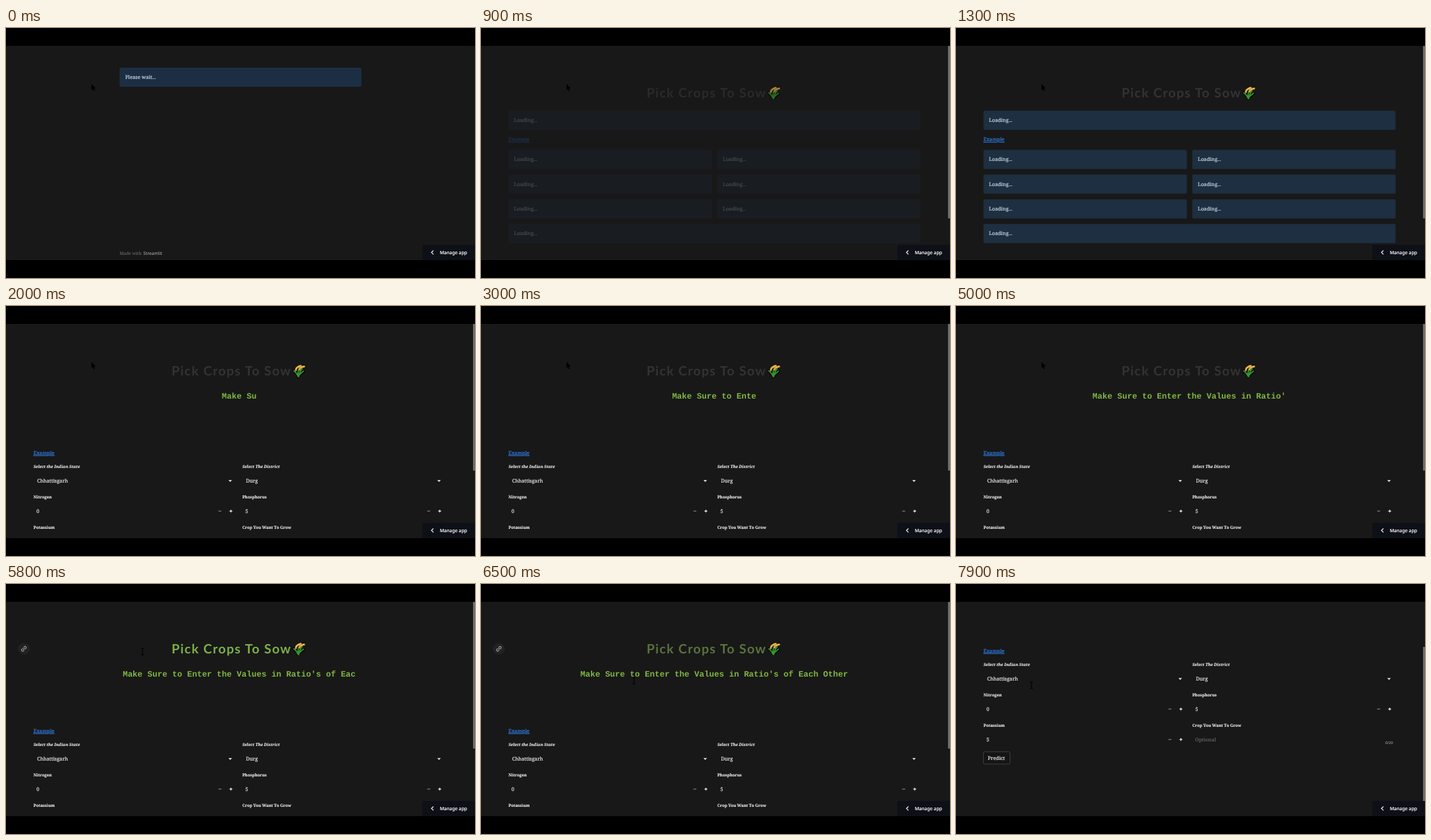
Animation, 708 px wide and 378 px high, one loop 8000 ms. Source, as an HTML page:

```html
<!DOCTYPE html>
<html lang="en">
<head>
<meta charset="utf-8">
<title>Crop planner</title>
<style>
  html, body { margin: 0; width: 100%; height: 100%; overflow: hidden; background: #000; }
  svg { display: block; width: 100vw; height: 100vh; }
  text { text-rendering: geometricPrecision; white-space: pre; }
  .serif { font: 7.6px "Noto Serif", serif; fill: #e8e8e8; stroke: #e8e8e8; stroke-width: .2px; }
  .label { font: bold 6.15px "Noto Serif", serif; fill: #f4f4f4; stroke: #f4f4f4; stroke-width: .1px; }
  .slant { font-style: italic; }
  .pale { fill: #c5d8e4; stroke: #c5d8e4; }
  .dim { fill: #77777a; stroke: none; }
  .sans { font: 6.7px "Noto Sans", sans-serif; fill: #bdbdc2; }
  .link { fill: #2f80f0; stroke: #2f80f0; text-decoration: underline; }
  .manage { font-size: 7px; fill: #fff; stroke: #fff; stroke-width: .2px; }
  .title { font: bold 19.5px Lato, sans-serif; letter-spacing: 1.3px; text-anchor: middle; }
  .typed { font: bold 12.47px "Liberation Mono", monospace; fill: #7fb840; text-anchor: middle; }
</style>
</head>
<body>
<svg viewBox="0 0 708 378">
  <defs><clipPath id="view"><rect y="27" width="708" height="324"/></clipPath></defs>
  <rect width="708" height="378"/>
  <g clip-path="url(#view)">
    <rect y="27" width="708" height="324" fill="#181818"/>
    <g id="wait">
      <rect x="171.5" y="60" width="365" height="29" rx="2" fill="#1c2e44"/>
      <text class="serif pale" x="180" y="77">Please wait...</text>
      <text class="serif dim" x="171.5" y="342.7" style="font-size:6.5px">Made with</text>
      <text class="sans" x="207.3" y="342.7">Streamlit</text>
    </g>
    <g id="page">
      <g id="head">
        <g id="anchor">
          <circle cx="27" cy="98" r="9" fill="#222"/>
          <g transform="translate(27 98) rotate(-45)" fill="none" stroke="#aaa" stroke-width="1">
            <path d="M-.8-1.7H-2.6a1.7 1.7 0 0 0 0 3.4H-.8M.8-1.7H2.6a1.7 1.7 0 0 1 0 3.4H.8M-1.8 0H1.8"/>
          </g>
        </g>
        <text class="title" id="title" x="340.5" y="105">Pick Crops To Sow</text>
        <g fill="none" stroke-linecap="round">
          <path d="M441 106Q440 97 449 91M441 106Q437 98 441 92M441 105L435 98M442 105L449 99" stroke="#080808" stroke-width="5"/>
          <path d="M441 106.500Q440 99 443 94M441 106.500Q439 101 434.500 98M441 106.500Q444 102 449 98.500M442 106.500Q443 99 447 95" stroke="#35952f" stroke-width="2"/>
          <path d="M437.500 97Q437.500 92.500 445 90.500M443 96Q444 92.500 450 91.500" stroke="#d9a13c" stroke-width="3"/>
          <path d="M438 95Q440 91.500 444 90M445 93.500L450 91" stroke="#f3cf7a" stroke-width="1"/>
        </g>
      </g>
      <text class="typed" id="typed" x="352" y="139.700"></text>
      <g id="loading"></g>
      <g id="form"></g>
    </g>
    <rect id="thumb" x="705" width="3" rx="1" fill="#6d6d6d"/>
    <path d="M628.500 351V330q0-2 2-2H708V351Z" fill="#0d1017"/>
    <path d="M645.300 336.300L642.300 339.300L645.300 342.300" fill="none" stroke="#fff" stroke-width="1.200"/>
    <text class="sans manage" x="655" y="341.600">Manage app</text>
    <path id="arrow" d="M0 0V9.500L2.100 7.600L3.600 11L5.200 10.300L3.700 7H6.500Z" fill="#000"/>
    <path id="beam" d="M-2.300-5H-.6L0-4.400L.6-5H2.300M0-4.400V4.400M-2.300 5H-.6L0 4.400L.6 5H2.300" fill="none" stroke="#000" stroke-width="1.100"/>
  </g>
</svg>
<script>
const $ = id => document.getElementById(id);
const LOOP = 8000, STEP = 100, SCROLL = 121;
const LEFT = 41.5, RIGHT = 356.7;

const text = (x, y, cls, s, style = "") =>
  `<text x="${x}" y="${y}" class="${cls}" style="${style}">${s}</text>`;
const bar = (x, y, w) =>
  `<rect x="${x}" y="${y}" width="${w}" height="29" rx="2" fill="#1d2f40"/>` +
  text(x + 8.3, y + 17, "serif pale", "Loading...");

// Placeholder bars; the first one makes way for the typed line.
const pair = y => bar(LEFT, y, 307) + bar(RIGHT, y, 307);
$("loading").innerHTML =
  `<g id="first">${bar(LEFT, 125, 622)}</g><g id="rest">` +
  text(LEFT, 171.3, "serif link", "Example") +
  pair(184.3) + pair(221.6) + pair(259) + bar(LEFT, 296.3, 622) + "</g>";

const select = (x, y, name, value) =>
  text(x, y, "label slant", name) + text(x + 5.5, y + 21.3, "serif", value) +
  `<path d="M${x + 294.3} ${y + 17.8}h5.400l-2.700 2.900z" fill="#eee"/>`;
const number = (x, y, name, value) =>
  text(x, y, "label", name) + text(x + 4.5, y + 21.5, "serif", value) +
  `<path d="M${x + 279.2} ${y + 18.8}h4.400" stroke="#999" stroke-width="1"/>` +
  `<path d="M${x + 295.8} ${y + 18.8}h4.400m-2.200-2.200v4.400" stroke="#f2f2f2" stroke-width="1.100"/>`;

$("form").innerHTML =
  text(LEFT, 224.8, "serif link", "Example") +
  select(LEFT, 245.4, "Select the Indian State", "Chhattisgarh") +
  select(RIGHT, 245.4, "Select The District", "Durg") +
  number(LEFT, 291.3, "Nitrogen", 0) +
  number(RIGHT, 291.3, "Phosphorus", 5) +
  number(LEFT, 337.3, "Potassium", 5) +
  text(RIGHT, 337.3, "label", "Crop You Want To Grow") +
  text(361, 358.9, "serif dim", "Optional") +
  text(648, 363.3, "sans", "0/20", "font-size:5.600px") +
  `<rect x="41.500" y="374.700" width="40" height="18.500" rx="2" fill="#151515" stroke="#4a4a4a" stroke-width=".8"/>` +
  text(48, 386.7, "serif", "Predict");

// Each word with the time of its first letter; one letter per step.
const words = [
  ["Make", 1500], ["Sure", 1900], ["to", 2400], ["Enter", 2700],
  ["the", 3300], ["Values", 3600], ["in", 4300], ["Ratio's", 4500],
  ["of", 5300], ["Each", 5600], ["Other", 6100]
];
const typedAt = t => words
  .filter(([, start]) => t >= start)
  .map(([word, start]) => word.slice(0, Math.floor((t - start) / STEP) + 1))
  .join(" ");

// Tables of [time, ...values], linear in between.
const pointer = [
  [0, 129, 84.5], [5000, 129, 84.5], [5100, 131, 87], [5500, 176, 104],
  [6000, 226, 101], [6400, 234, 140], [6500, 231, 146], [6600, 184, 141],
  [6700, 136, 133], [7300, 136, 133], [7600, 88, 147], [7900, 114, 153]
];
const hover = [[5200, 0], [5600, 1], [6300, 1], [6700, 0]];
const scroll = [[6900, 0], [7000, 0.35], [7100, 0.8], [7200, 1]];
const waitFade = [[500, 1], [900, 0]];
const headFade = [[700, 0], [1000, 1]];
const loadFade = [[800, 0], [1200, 1]];

function at(table, t) {
  const i = table.findIndex(row => row[0] > t);
  if (i === 0) return table[0].slice(1);
  if (i < 0) return table[table.length - 1].slice(1);
  const a = table[i - 1], b = table[i];
  const k = (t - a[0]) / (b[0] - a[0]);
  return a.slice(1).map((v, n) => v + (b[n + 1] - v) * k);
}

const show = (id, opacity) => $(id).setAttribute("opacity", Number(opacity));
const move = (id, x, y) => $(id).setAttribute("transform", `translate(${x} ${y})`);
const mix = (a, b, k) => `rgb(${a.map((v, i) => Math.round(v + (b[i] - v) * k))})`;

function draw(t) {
  const [glow] = at(hover, t), [p] = at(scroll, t), [x, y] = at(pointer, t);
  show("wait", t < 600 ? 1 : at(waitFade, t)[0]);
  show("head", at(headFade, t)[0]);
  show("loading", t < 1500 ? at(loadFade, t)[0] : 0);
  show("first", t < 1400);
  move("rest", 0, t < 1400 ? 0 : 53.5);
  show("form", t >= 1500);
  $("typed").textContent = typedAt(t);

  $("title").setAttribute("fill", mix([51, 51, 51], [126, 176, 72], glow));
  show("anchor", Math.min(1, glow * 2));

  move("page", 0, -SCROLL * p);
  show("thumb", t >= 900);
  $("thumb").setAttribute("y", 27 + 68 * p);
  $("thumb").setAttribute("height", t < 1500 ? 261 : 222 + 34 * p);

  const overText = t >= 5400;
  show("arrow", !overText);
  show("beam", overText);
  move(overText ? "beam" : "arrow", x, y);
}

const begin = performance.now();
function tick() {
  const t = (performance.now() - begin) % LOOP;
  draw(Math.floor(t / STEP) * STEP);
  requestAnimationFrame(tick);
}
tick();
</script>
</body>
</html>
```
